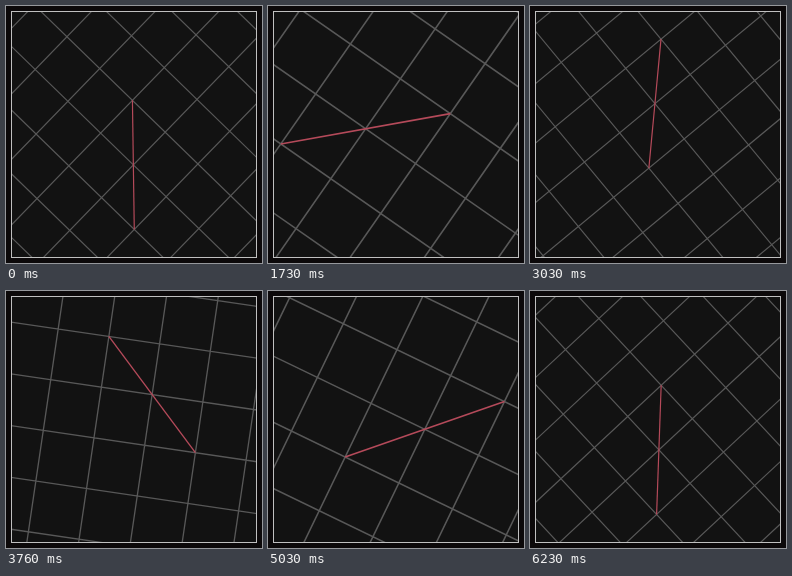
An HTML page for the animation above (6270 ms loop, 256x257 px).

```html
<!DOCTYPE html>
<html lang="en">
<head>
<meta charset="utf-8">
<title>Orbiting grid</title>
<style>
  html, body { margin: 0; width: 100%; height: 100%; overflow: hidden; background: #0c090a; }
  svg { display: block; width: 100%; height: 100%; }
  path { fill: none; stroke-width: 0.026; }
  .frame { fill: none; stroke: #c0c0c0; }
</style>
</head>
<body>
<svg viewBox="0 0 256 257">
  <clipPath id="window"><rect x="5" y="5" width="246" height="247"/></clipPath>
  <g clip-path="url(#window)">
    <rect width="256" height="257" fill="#121212"/>
    <g id="plane">
      <path id="grid" stroke="#585858"/>
      <path d="M-1-1L1 1" stroke="#b54a5a"/>
    </g>
  </g>
  <rect class="frame" x="5.5" y="5.5" width="245" height="246"/>
</svg>
<script>
  const LOOP = 6270, STEPS = 188, FPS = 30;
  const CENTER = { x: 127.8, y: 128.2 }, ORBIT = 30.7;
  const REACH = 7;
  const plane = document.getElementById('plane');

  let lines = '';
  for (let i = -REACH; i <= REACH; i++) {
    lines += `M${i} ${-REACH}V${REACH}M${-REACH} ${i}H${REACH}`;
  }
  document.getElementById('grid').setAttribute('d', lines);

  // The grid spins one way while its origin orbits the other way.
  function render(ms) {
    const step = Math.min(STEPS - 1, Math.floor((ms % LOOP + 10) * FPS / 1000));
    const angle = step / FPS + 0.0145;
    const x = CENTER.x - ORBIT * Math.sin(angle);
    const y = CENTER.y + ORBIT * Math.cos(angle);
    const cell = 53.5 - 7.85 * Math.cos(2 * angle);
    const turn = 45 - angle * 180 / Math.PI;
    plane.setAttribute('transform', `translate(${x} ${y}) rotate(${turn}) scale(${cell})`);
  }

  const start = performance.now();
  function tick() {
    render(performance.now() - start);
    requestAnimationFrame(tick);
  }
  tick();
</script>
</body>
</html>
```
